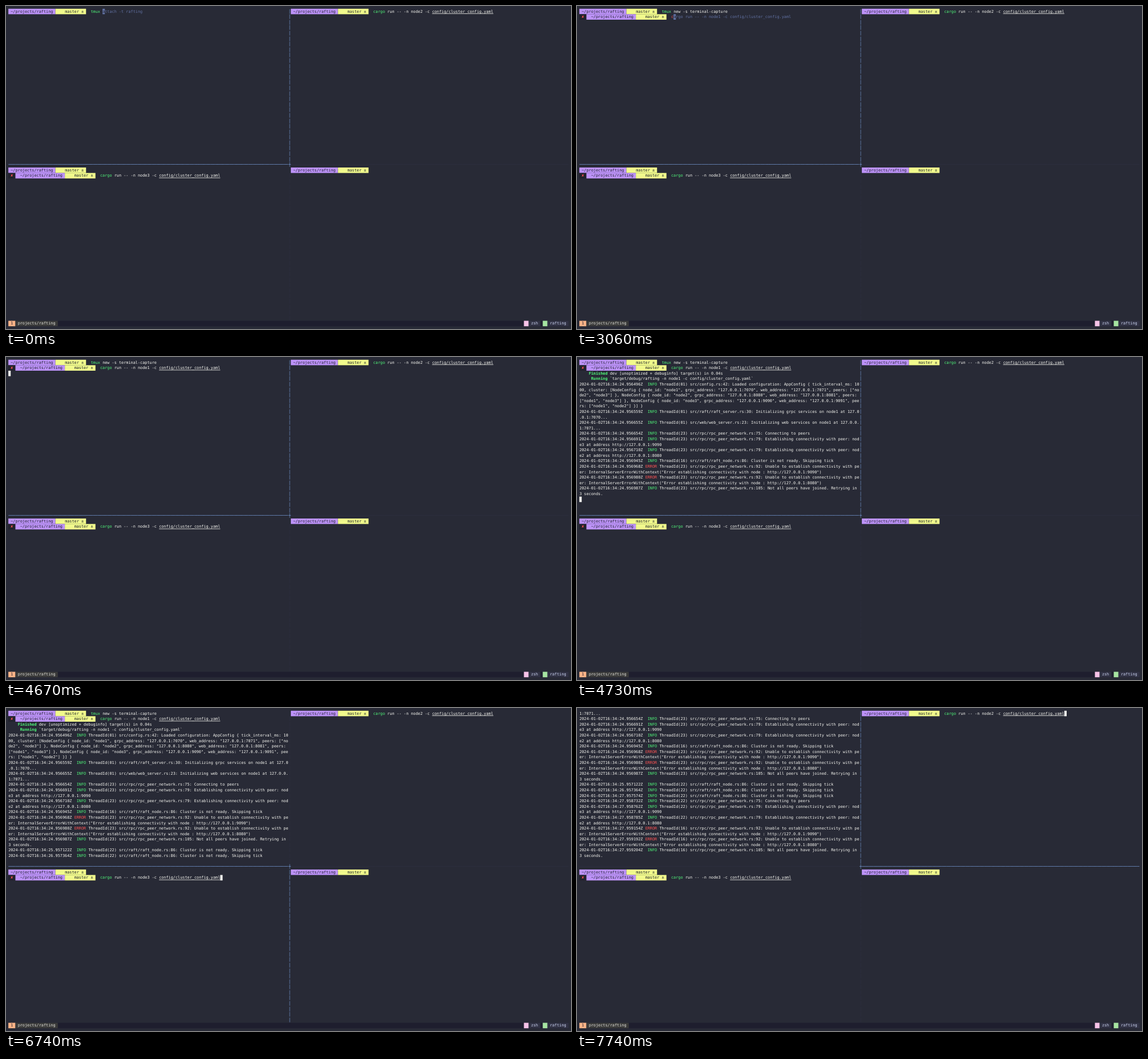
These frames come from a looping animation (990x566 px, 8 s). An HTML page:

```html
<!DOCTYPE html>
<html lang="en">
<head>
<meta charset="utf-8">
<title>Terminal session</title>
<style>
  html, body { margin: 0; width: 100%; height: 100%; overflow: hidden; background: #282a36; }
  svg { display: block; width: 990px; height: 566px; }
  text {
    font-family: "DejaVu Sans Mono", monospace;
    font-size: 6.8516px;
    white-space: pre;
    text-rendering: geometricPrecision;
  }
</style>
</head>
<body>
<svg id="screen" viewBox="0 0 990 566"></svg>
<script>
const LOOP = 8000;
const COLS = 238, SPLIT_COL = 119, SPLIT_ROW = 28, STATUS_ROW = 57;
const CELL_W = 990 / (COLS + 2), CELL_H = 566 / 59;
const BASELINE = 6.85;

const C = {
  bg: "#282a36", fg: "#f8f8f2", black: "#21222c", red: "#ff5555", green: "#50fa7b",
  yellow: "#f1fa8c", purple: "#bd93f9", ghost: "#6272a4",
  border: "#313244", active: "#89b4fa",
  bar: "#1e1e2e", chip: "#313244", barText: "#cdd6f4",
  peach: "#fab387", tab: "#3a3a3a", tabText: "#e4e4dc", pink: "#f5c2e7", mint: "#a6e3a1"
};

const screen = document.getElementById("screen");
const cellX = col => (col + 1) * CELL_W;
const cellY = row => (row + 0.5) * CELL_H;

function add(name, attrs, content) {
  const el = document.createElementNS("http://www.w3.org/2000/svg", name);
  for (const key in attrs) el.setAttribute(key, attrs[key]);
  if (content) el.textContent = content;
  screen.append(el);
}

function box(col, row, cols, fill) {
  add("rect", { x: cellX(col), y: cellY(row), width: cols * CELL_W, height: CELL_H, fill });
}

function put(col, row, text, fg = C.fg, bg, style) {
  if (bg) box(col, row, text.length, bg);
  if (text.trim()) {
    const indent = text.length - text.trimStart().length;
    add("text", {
      x: cellX(col + indent), y: cellY(row) + BASELINE, fill: fg,
      "font-weight": style === "bold" ? 700 : 400
    }, text.trim());
  }
  if (style === "underline") {
    add("rect", {
      x: cellX(col), y: cellY(row) + 8.1, width: text.length * CELL_W, height: 0.8, fill: fg
    });
  }
}

// A row is a list of [col, text, fg, bg, style] segments.
function putRow(col, row, segments) {
  for (const [offset, ...rest] of segments) put(col + offset, row, ...rest);
}

function prompt(failed) {
  const start = failed ? 3 : 0;
  const path = (failed ? "  " : " ") + "~/projects/rafting ";
  const segments = [
    [start, path, C.black, C.purple],
    [start + path.length, "    master ± ", C.black, C.yellow]
  ];
  if (failed) segments.unshift([0, " ✘ ", C.red, C.black]);
  return segments;
}

function command(col, typed, ghost = "") {
  const [, word, rest, path] = typed.match(/^(\S*)(.*?)(config\/\S+)?$/);
  const known = word === "tmux" || word === "cargo";
  const segments = [[col, word, known ? C.green : C.red], [col + word.length, rest]];
  if (path) segments.push([col + word.length + rest.length, path, C.fg, null, "underline"]);
  if (ghost) segments.push([col + typed.length, ghost, C.ghost]);
  return segments;
}

const cargoRun = node => `cargo run -- -n ${node} -c config/cluster_config.yaml`;
const latest = (steps, t) => steps.filter(step => step[0] <= t).pop();

// Log output
const ADDR = "127.0.0.1:";
const NET = "src/rpc/rpc_peer_network.rs:";
const nodeConfig = (n, peers) => {
  const port = 5050 + n * 1010 + 1010;
  return `NodeConfig { node_id: "node${n}", grpc_address: "${ADDR}${port}", ` +
    `web_address: "${ADDR}${port + 1}", peers: ["node${peers[0]}", "node${peers[1]}"] }`;
};
const CLUSTER = [nodeConfig(1, [2, 3]), nodeConfig(2, [1, 3]), nodeConfig(3, [1, 2])].join(", ");
const CONNECT = NET + "75: Connecting to peers";
const SKIP = "src/raft/raft_node.rs:86: Cluster is not ready. Skipping tick";
const RETRY = NET + "105: Not all peers have joined. Retrying in 3 seconds.";
const establish = (n, port) =>
  `${NET}79: Establishing connectivity with peer: node${n} at address http://${ADDR}${port}`;
const unable = port =>
  `${NET}92: Unable to establish connectivity with peer: ` +
  `InternalServerErrorWithContext("Error establishing connectivity with node : http://${ADDR}${port}")`;

// [time shown, stamp, thread, message]
const LOG = [
  [4730, "24.956496", "01", `src/config.rs:42: Loaded configuration: AppConfig { tick_interval_ms: 1000, cluster: [${CLUSTER}] }`],
  [4730, "24.956559", "01", `src/raft/raft_server.rs:30: Initializing grpc services on node1 at ${ADDR}7070...`],
  [4730, "24.956655", "01", `src/web/web_server.rs:23: Initializing web services on node1 at ${ADDR}7071...`],
  [4730, "24.956654", "23", CONNECT],
  [4730, "24.956691", "23", establish(3, 9090)],
  [4730, "24.956710", "23", establish(2, 8080)],
  [4730, "24.956945", "16", SKIP],
  [4730, "24.956968", "23", unable(9090)],
  [4730, "24.956980", "23", unable(8080)],
  [4730, "24.956987", "23", RETRY],
  [5740, "25.957122", "22", SKIP],
  [6740, "26.957364", "22", SKIP],
  [7740, "27.957574", "22", SKIP],
  [7740, "27.958732", "22", CONNECT],
  [7740, "27.958762", "22", establish(3, 9090)],
  [7740, "27.958785", "22", establish(2, 8080)],
  [7740, "27.959154", "16", unable(9090)],
  [7740, "27.959192", "16", unable(8080)],
  [7740, "27.959204", "16", RETRY]
];

function logRows([, stamp, thread, message]) {
  const error = message.includes("Unable");
  const time = `2024-01-02T16:34:${stamp}Z`;
  const text = `${time}       ThreadId(${thread}) ${message}`;
  const rows = [];
  for (let i = 0; i < text.length; i += SPLIT_COL) rows.push([[0, text.slice(i, i + SPLIT_COL)]]);
  rows[0] = [
    [0, time],
    [28, error ? "ERROR" : " INFO", error ? C.red : C.green],
    [34, rows[0][0][1].slice(34)]
  ];
  return rows;
}

// First shell: typed commands, then program output
const RECALL = [
  [0, "tmux ", "attach -t rafting"],
  [640, "tmux attach -t rafting"],
  [760, "tmux new -s rafting"],
  [1220, "tmux new -s terminal-capture"]
];
const KEYS = [3060, 3150, 3240, 3380, 3455, 3530, 3605, 3680, 3860];

function firstShell(t) {
  const [, typed, ghost = ""] = latest(RECALL, t);
  const rows = [[...prompt(false), ...command(35, typed, ghost)]];
  let cursor = [35 + typed.length, ghost];

  if (t >= 1820) {
    rows.push([]);
    cursor = [0, ""];
  }
  if (t >= 1860) {
    const line = cargoRun("node1");
    const count = t >= 4430 ? line.length : KEYS.filter(key => key <= t).length;
    const rest = count ? line.slice(count) : "";
    rows[1] = [...prompt(true), ...command(39, line.slice(0, count), rest)];
    cursor = [39 + count, rest];
  }
  if (t >= 4670) cursor = [0, ""];
  if (t >= 4730) {
    rows.push(
      [[4, "Finished", C.green, null, "bold"],
       [13, "dev [unoptimized + debuginfo] target(s) in 0.04s"]],
      [[5, "Running", C.green, null, "bold"],
       [13, "`target/debug/rafting -n node1 -c config/cluster_config.yaml`"]]
    );
    for (const entry of LOG) if (entry[0] <= t) rows.push(...logRows(entry));
  }
  if (t >= 4670) rows.push([]);
  return { rows: rows.slice(-SPLIT_ROW), cursor };
}

function putCursor(col, row, ghost = "") {
  put(col, row, ghost[0] || " ", C.bg, ghost ? C.ghost : C.fg);
}

function borders(pane) {
  const color = on => on ? C.active : C.border;
  for (let row = 0; row < STATUS_ROW; row++) {
    const on = row < SPLIT_ROW ? pane !== "bottomLeft" : pane === "bottomLeft";
    if (row !== SPLIT_ROW) put(SPLIT_COL, row, "│", color(on));
  }
  put(0, SPLIT_ROW, "─".repeat(SPLIT_COL), color(pane !== "topRight"));
  put(SPLIT_COL + 1, SPLIT_ROW, "─".repeat(COLS - SPLIT_COL - 1), color(pane === "topRight"));
  put(SPLIT_COL, SPLIT_ROW, "┼", C.active);
}

function statusBar(program) {
  box(0, STATUS_ROW, COLS, C.bar);
  put(0, STATUS_ROW, " 1 ", C.bar, C.peach);
  put(3, STATUS_ROW, " projects/rafting ", C.tabText, C.tab);
  const chip = (end, label, color) => {
    const start = end - label.length - 2;
    box(start - 2, STATUS_ROW, 2, color);
    put(start, STATUS_ROW, ` ${label} `, C.barText, C.chip);
  };
  chip(226, program, C.pink);
  chip(COLS, "rafting", C.mint);
}

function draw(t) {
  screen.replaceChildren();
  const pane = t < 5950 ? "topLeft" : t < 7440 ? "bottomLeft" : "topRight";
  const right = SPLIT_COL + 1, below = SPLIT_ROW + 1;
  const { rows, cursor } = firstShell(t);
  const second = cargoRun("node2"), third = cargoRun("node3");

  rows.forEach((row, i) => putRow(0, i, row));
  putRow(right, 0, [...prompt(false), ...command(35, second)]);
  putRow(0, below, prompt(false));
  putRow(0, below + 1, [...prompt(true), ...command(39, third)]);
  putRow(right, below, prompt(false));
  borders(pane);

  if (pane === "topLeft") putCursor(cursor[0], rows.length - 1, cursor[1]);
  if (pane === "bottomLeft") putCursor(39 + third.length, below + 1);
  if (pane === "topRight") putCursor(right + 35 + second.length, 0);
  statusBar(t >= 5740 && t < 6250 ? "target/debug/rafting" : "zsh");
}

const CHANGES = [0, 640, 760, 1220, 1820, 1860, ...KEYS, 4430, 4670, 4730, 5740, 5950, 6250, 6740, 7440, 7740];
const begin = performance.now();
let shown = -1;

function tick() {
  const t = (performance.now() - begin) % LOOP;
  const step = CHANGES.filter(time => time <= t).pop();
  if (step !== shown) draw(shown = step);
  requestAnimationFrame(tick);
}
tick();
</script>
</body>
</html>
```
